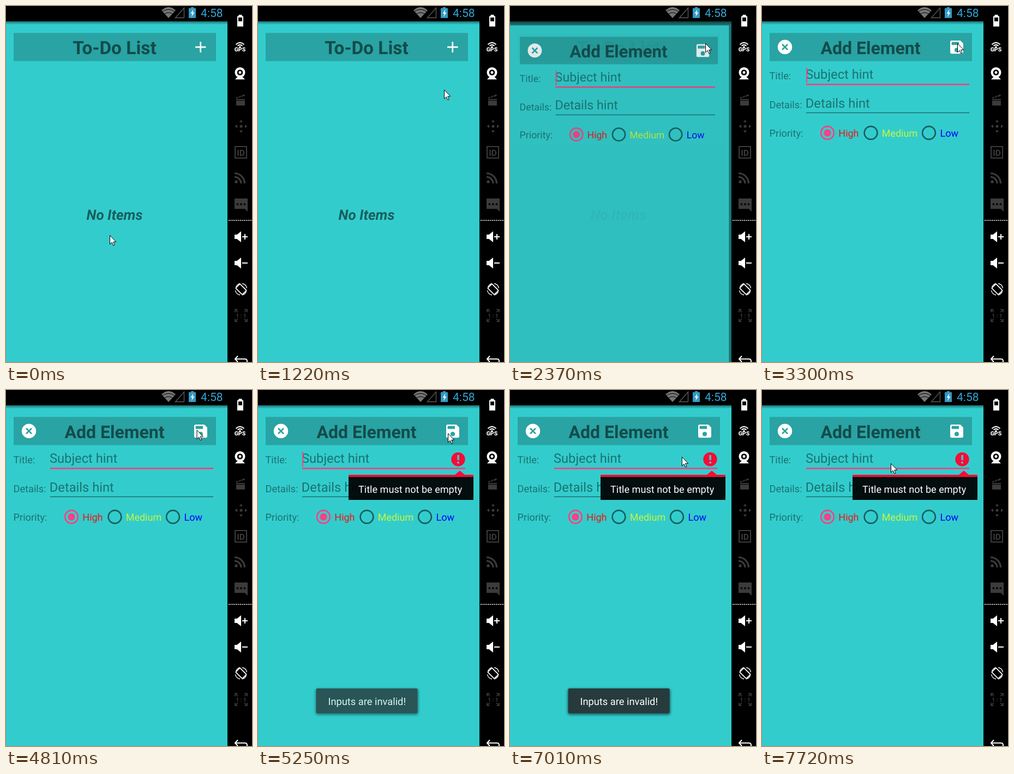
Write an HTML page that moves like this. It is 451 by 651 pixels and loops after 7990 ms.

```html
<!DOCTYPE html>
<html lang="en">
<head>
<meta charset="utf-8">
<title>To-Do List</title>
<style>
html, body { margin: 0; width: 100%; height: 100%; overflow: hidden; background: #000; }
svg { display: block; width: 100vw; height: 100vh; }
text { font-family: Roboto, sans-serif; text-rendering: geometricPrecision; white-space: pre; }
.head { font-weight: 700; fill: #134b4b; text-anchor: middle; }
.label { font-size: 18.2px; fill: #1b7272; }
.hint { font-size: 23.7px; fill: #1b7272; }
.ring { fill: none; stroke: #175e5e; stroke-width: 2.6; }
.on { fill: #fff; }
.off { fill: #3b3b3b; }
.line { fill: none; stroke: #fff; stroke-width: 2; }
.dark { fill: none; stroke: #3b3b3b; stroke-width: 2; }
</style>
</head>
<body>
<svg viewBox="0 0 451 651" preserveAspectRatio="none">
  <defs>
    <linearGradient id="shade" x1="0" y1="0" x2="0" y2="1">
      <stop offset="0" stop-opacity=".45"/>
      <stop offset="1" stop-opacity="0"/>
    </linearGradient>
    <filter id="blur" x="-10%" y="-30%" width="120%" height="160%"><feGaussianBlur stdDeviation="2.5"/></filter>
    <clipPath id="app"><rect y="28" width="406" height="623"/></clipPath>
    <g id="page">
      <rect x="-7" y="28" width="413" height="678" fill="#33cccc"/>
      <rect x="14" y="49.3" width="371" height="51.4" fill="#29a3a3"/>
    </g>
    <path id="speaker" d="M419 418h4.500l7.500-6v20l-7.500-6h-4.500z"/>
  </defs>
  <rect width="451" height="651"/>

  <g clip-path="url(#app)">
    <g id="list">
      <use href="#page"/>
      <text class="head" x="199" y="88" font-size="33.400">To-Do List</text>
      <path d="M347 75.200h19.500M356.700 65.500v19.500" stroke="#fff" stroke-width="2.800"/>
      <text x="199" y="391" font-size="26" font-weight="700" font-style="italic" fill="#175e5e" text-anchor="middle">No Items</text>
    </g>
    <rect id="dim" y="28" width="406" height="623"/>

    <g id="form">
      <use href="#page"/>
      <circle cx="42" cy="75" r="13.200" fill="#fff"/>
      <path d="M37 70l10 10M47 70l-10 10" stroke="#29a3a3" stroke-width="2.600"/>
      <text class="head" x="199" y="88" font-size="32">Add Element</text>
      <path transform="translate(341 59.2) scale(1.33)" fill="#fff" fill-rule="evenodd"
        d="M17 3H5a2 2 0 0 0-2 2v14a2 2 0 0 0 2 2h14a2 2 0 0 0 2-2V7zM12 19a3 3 0 0 1 0-6a3 3 0 0 1 0 6zM15 9H5V5h10z"/>
      <text class="label" x="13.500" y="134">Title:</text>
      <text class="label" x="13.500" y="187">Details:</text>
      <text class="label" x="13.500" y="239">Priority:</text>
      <text class="hint" x="80" y="133">Subject hint</text>
      <text class="hint" x="79.800" y="185.500">Details hint</text>
      <rect x="81" y="142" width="299" height="2.700" fill="#ff4081"/>
      <rect x="81" y="194.500" width="299" height="1.500" fill="#1b7070"/>
      <rect id="caret" x="81" y="113" width="2" height="27" fill="#ff4081"/>
      <circle class="ring" cx="120" cy="232" r="11.900" style="stroke:#ff4081"/>
      <circle cx="120" cy="232" r="6.600" fill="#ff4081"/>
      <circle class="ring" cx="199.500" cy="232" r="11.900"/>
      <circle class="ring" cx="306" cy="232" r="11.900"/>
      <g font-size="18">
        <text x="140.300" y="239" fill="#f01414">High</text>
        <text x="219.700" y="239" fill="#c8f53c">Medium</text>
        <text x="326.500" y="239" fill="#0000ff">Low</text>
      </g>
    </g>

    <g id="error">
      <circle cx="367" cy="126.700" r="12.700" fill="#fc0a35"/>
      <path d="M365.300 119h3.600v9.300h-3.600zM365.300 131h3.600v3.600h-3.600z" fill="#33cccc"/>
      <rect x="166" y="155" width="229" height="46" opacity=".93"/>
      <path d="M166 155H361L370 147.500L379 155H395V159H166z" fill="#fc0a35"/>
      <text x="184" y="188" font-size="18.100" fill="#fff">Title must not be empty</text>
    </g>

    <g id="toast">
      <rect x="106" y="547" width="187.500" height="46.500" rx="3" opacity=".6" filter="url(#blur)"/>
      <rect x="106.700" y="545.700" width="185.800" height="45.300" rx="2" fill="#273a3c"/>
      <text x="199.800" y="576" font-size="18.300" fill="#fff" text-anchor="middle">Inputs are invalid!</text>
    </g>
    <rect y="28" width="406" height="6" fill="url(#shade)"/>
  </g>

  <g id="status">
    <path d="M285 8Q298 -4 311 8L298 22z" fill="#757575"/>
    <path d="M285 11.500Q298 1 311 11.500M289 15.500Q298 8.500 307 15.500" fill="none" stroke="#000"/>
    <path d="M326.500 3.500V21.500H310.500z" fill="none" stroke="#5c5c5c" stroke-width="1.300"/>
    <path d="M339 2h5v2h4v18h-13v-18h4z" fill="#3498c4"/>
    <path d="M343.500 6l-5 8h3l-1.500 6l5.500-8h-3z" fill="#e8f6fc"/>
    <text x="357" y="20" font-size="21" fill="#33a5d6">4:58</text>
  </g>

  <g id="side">
    <path class="on" d="M426.500 16h6v2.500h2.500v19h-11v-19h2.500z"/>
    <rect x="426" y="21" width="7" height="7"/>
    <path class="line" d="M421.500 70.500Q429 63.500 436.500 70.500M424.500 73Q429 69 433.500 73"/>
    <circle class="on" cx="429" cy="74.500" r="1.500"/>
    <text class="on" x="429" y="83" font-size="10.500" font-weight="900" text-anchor="middle">GPS</text>
    <circle class="on" cx="429" cy="121.500" r="9.500"/>
    <circle cx="429" cy="121.500" r="5.300"/>
    <circle class="on" cx="429" cy="121.500" r="2.500"/>
    <path class="on" d="M424 130h10l4 4.200h-18z"/>
    <path class="off" d="M422 170h16v12h-16zM421.500 167.500l15.500-6l1 2.800l-15.500 5z"/>
    <path d="M425 169l3-5M430.500 167l3-5M422 172.500h16" stroke="#000" stroke-width="1.200"/>
    <circle class="off" cx="431" cy="220" r="2.600"/>
    <path class="off" d="M431 208l3.200 4.500h-6.400zM431 232l3.200-4.500h-6.400zM419.500 220l4.500-3.200v6.400zM442.500 220l-4.500-3.200v6.400z"/>
    <rect class="dark" x="420" y="257" width="21" height="21"/>
    <text class="off" x="430.500" y="273.500" font-size="15.500" font-weight="700" text-anchor="middle">ID</text>
    <circle class="off" cx="422" cy="321.500" r="2.700"/>
    <path class="dark" style="stroke-width:3.200" d="M419 312.500A12 12 0 0 1 431 324.500M419 306A18.500 18.500 0 0 1 437.500 324.500"/>
    <path class="off" d="M419 352h24v24l-5-5h-19z"/>
    <path d="M424.500 362.500h.01M431 362.500h.01M437.500 362.500h.01" stroke="#000" stroke-width="3.800" stroke-linecap="round"/>
    <path d="M408 392H451" stroke="#c4c4c4" stroke-width="2" stroke-dasharray="2 1.500"/>
    <use class="on" href="#speaker"/>
    <use class="on" href="#speaker" y="48"/>
    <path class="line" d="M433 422h10M438 417v10M433 470h10"/>
    <rect class="line" style="stroke-width:1.700" x="425.500" y="509.500" width="11" height="17" rx="1" transform="rotate(-45 431 518)"/>
    <path class="line" style="stroke-width:1.300" d="M421.500 514A10.500 10.500 0 0 1 429 507.500M433 507.500A10.500 10.500 0 0 1 441.500 516M440.500 522A10.500 10.500 0 0 1 433 528.500M429 528.500A10.500 10.500 0 0 1 420.500 520"/>
    <path class="dark" style="stroke-width:1.700" d="M420 560v-5h5M420 555l5 5M437 555h5v5M442 555l-5 5M420 572v5h5M420 577l5-5M442 572v5h-5M442 577l-5-5"/>
    <text class="off" x="431" y="569.500" font-size="10" font-weight="700" text-anchor="middle">1 : 1</text>
    <path class="line" d="M425 640l-5 5.500l5 5.500M420 645.500h18q4 0 4 4v4"/>
  </g>

  <path id="mouse" d="M.5 .5V16.800L4.200 13.300L6.800 19L9.200 18L6.700 12.300H11.800z" fill="#fff" stroke="#000"/>
</svg>
<script>
const LOOP = 7990;
const el = id => document.getElementById(id);
const [dim, form, caret, error, toast, mouse] =
  ["dim", "form", "caret", "error", "toast", "mouse"].map(el);

const ramp = (t, from, to) => Math.min(1, Math.max(0, (t - from) / (to - from)));
const easeOut = p => 1 - (1 - p) ** 1.7;
const mix = (a, b, p) => a + (b - a) * p;

// Turning points of the pointer: time, x, y.
const turns = [
  [140, 190, 419], [420, 115, 427], [1100, 310, 259], [1220, 341, 153], [1760, 358, 68],
  [3570, 358, 68], [3690, 350, 71], [4680, 350, 71], [5250, 348, 79],
  [5930, 346, 130], [6330, 215, 204], [6860, 390, 150], [7010, 315, 122], [7420, 236, 134]
];

function pointerAt(t) {
  const i = turns.findIndex(turn => turn[0] > t);
  if (i < 1) return turns.at(i).slice(1);
  const [t0, x0, y0] = turns[i - 1], [t1, x1, y1] = turns[i];
  const p = ramp(t, t0, t1);
  return [mix(x0, x1, p), mix(y0, y1, p)];
}

function draw(t) {
  mouse.setAttribute("transform", `translate(${pointerAt(t)})`);

  const open = easeOut(ramp(t, 2070, 2500));
  form.setAttribute("opacity", open);
  form.setAttribute("transform", `translate(199.5 367) scale(${mix(.83, 1, open)}) translate(-199.5 -367)`);
  dim.setAttribute("opacity", open * .52);

  caret.setAttribute("opacity", (t + 690) % 990 < 430 ? 1 : 0);
  error.setAttribute("opacity", t >= 4820 ? 1 : 0);
  toast.setAttribute("opacity", easeOut(ramp(t, 4960, 5430)) * (1 - ramp(t, 7010, 7420)));
}

const start = performance.now();
function tick(now) {
  draw(Math.max(0, now - start) % LOOP);
  requestAnimationFrame(tick);
}
draw(0);
requestAnimationFrame(tick);
</script>
</body>
</html>
```
